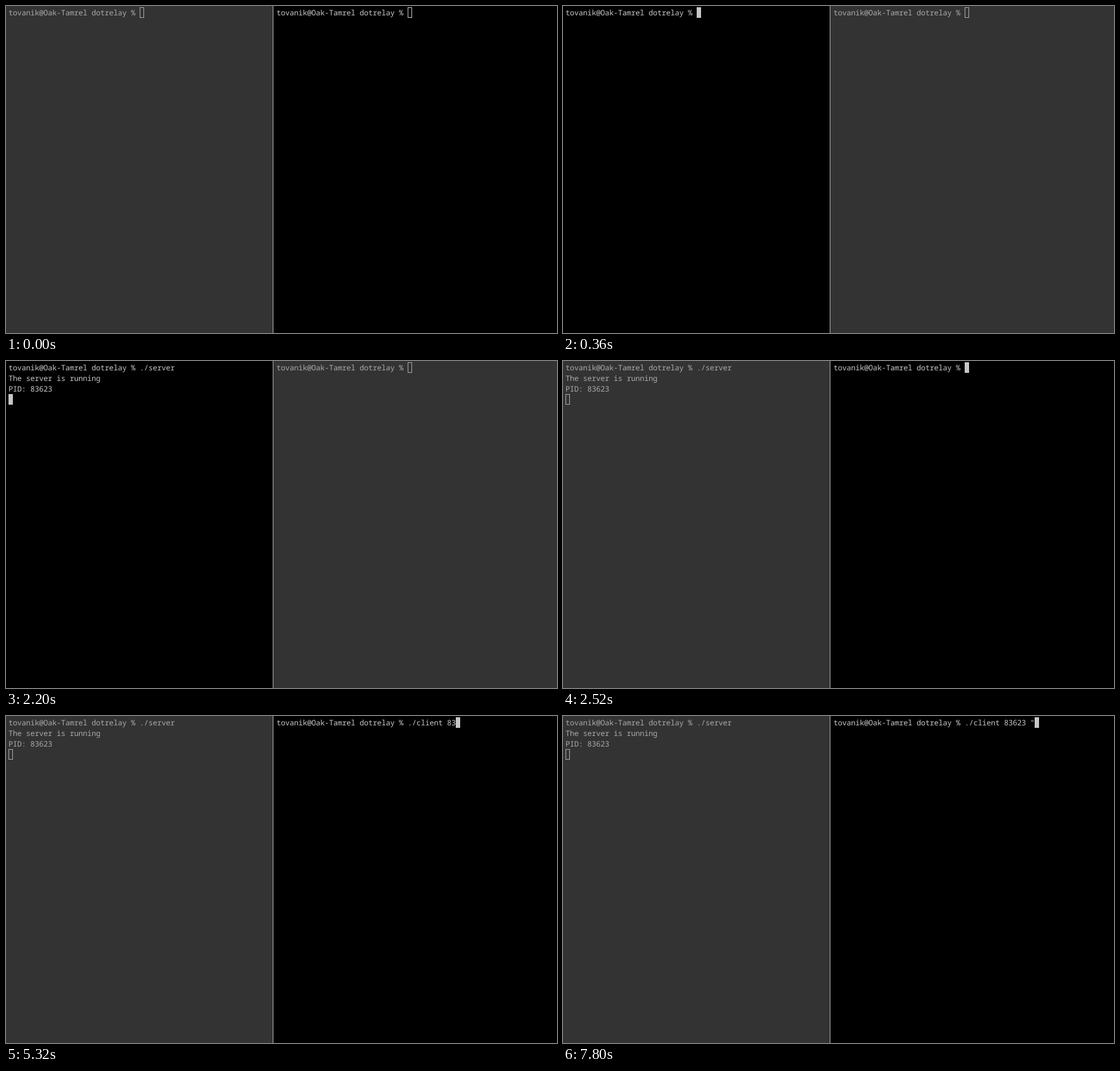
An HTML page for the animation above (8 s loop, 882x524 px).

```html
<!DOCTYPE html>
<html lang="en">
<head>
<meta charset="utf-8">
<title>Split terminal</title>
<style>
  html, body { margin: 0; width: 100%; height: 100%; overflow: hidden; background: #000; }
  svg { display: block; width: 882px; height: 524px; }
  text {
    font: 12px "Noto Sans Mono", "DejaVu Sans Mono", monospace;
    letter-spacing: -0.2px;
    white-space: pre;
    text-rendering: geometricPrecision;
  }
</style>
</head>
<body>
<svg id="stage" viewBox="0 0 882 524" xmlns="http://www.w3.org/2000/svg"></svg>
<script>
const LOOP = 8000;
const CELL = 7, LINE = 17, TOP = 2, BASELINE = 13;
const PROMPT = "tovanik@Oak-Tamrel dotrelay % ";
const SWITCH = 2520;
const FADE = { start: 40, step: 64, count: 6 };

// Each entry: time of the change, text on the command line from then on
const SERVER_KEYS = [[720, "."], [920, "./"], [1080, "./s"], [1320, "./server "]];
const SERVER_START = 1720;
const SERVER_OUTPUT = ["The server is running", "PID: 83623", ""];
const CLIENT_KEYS = [
  [3040, "."], [3240, "./"], [3440, "./c"], [3680, "./cl"], [3880, "./client "],
  [4880, "./client 8"], [5320, "./client 83"], [6440, "./client 836"],
  [6840, "./client 8362"], [7040, "./client 83623"],
  [7320, "./client 83623 "], [7800, "./client 83623 \""]
];

const stage = document.getElementById("stage");

function add(tag, attrs) {
  const el = document.createElementNS("http://www.w3.org/2000/svg", tag);
  set(el, attrs);
  stage.appendChild(el);
  return el;
}

function set(el, attrs) {
  for (const key in attrs) el.setAttribute(key, attrs[key]);
}

const gray = v => `rgb(${Math.round(v)},${Math.round(v)},${Math.round(v)})`;

function makePane(x, width, textX, rows) {
  return {
    textX,
    back: add("rect", { x, y: 0, width, height: 524 }),
    rows: Array.from({ length: rows }, (_, i) =>
      add("text", { x: textX, y: TOP + BASELINE + i * LINE })),
    cursor: add("rect", { width: CELL - 1, height: LINE - 1, "stroke-width": 1 })
  };
}

const left = makePane(0, 427, 4, 4);
const right = makePane(428, 454, 433, 1);
add("rect", { x: 427, y: 0, width: 1, height: 524, fill: "#b4b4b4" });

function typed(keys, t) {
  let text = "";
  for (const [time, value] of keys) if (t >= time) text = value;
  return text;
}

function drawPane(pane, lines, dim, solid) {
  const ink = gray(199 - 29 * dim);
  const last = lines.length - 1;
  set(pane.back, { fill: gray(51 * dim) });
  pane.rows.forEach((row, i) => {
    row.textContent = lines[i] || "";
    set(row, { fill: ink });
  });
  set(pane.cursor, {
    x: pane.textX + lines[last].length * CELL + 0.5,
    y: TOP + last * LINE + 0.5,
    stroke: ink,
    fill: solid ? ink : "none"
  });
}

function draw(t) {
  const step = Math.floor((t - FADE.start) / FADE.step) + 1;
  const fade = Math.max(0, Math.min(FADE.count, step)) / FADE.count;
  const onRight = t >= SWITCH;
  const leftDim = onRight ? 1 : 1 - fade;
  const leftLines = [PROMPT + typed(SERVER_KEYS, t)];
  if (t >= SERVER_START) leftLines.push(...SERVER_OUTPUT);

  drawPane(left, leftLines, leftDim, !onRight && fade > 0);
  drawPane(right, [PROMPT + typed(CLIENT_KEYS, t)], onRight ? 0 : fade, onRight);
}

const origin = performance.now();
function tick() {
  draw((performance.now() - origin) % LOOP);
  requestAnimationFrame(tick);
}
draw(0);
requestAnimationFrame(tick);
</script>
</body>
</html>
```
